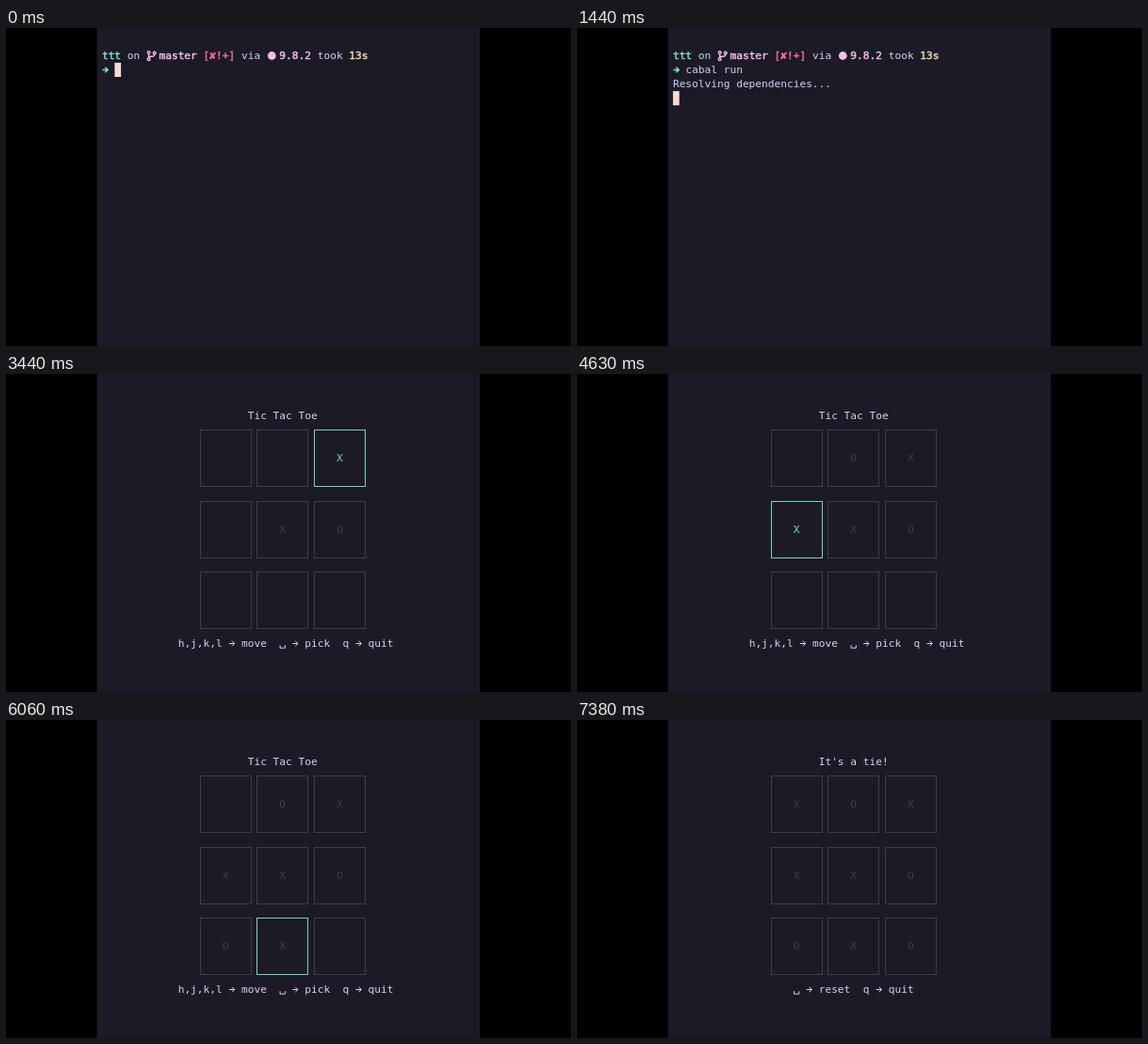
Animation, 600 px wide and 338 px high, one loop 8000 ms. Source, as an HTML page with a canvas:

```html
<!DOCTYPE html>
<html lang="en">
<head>
<meta charset="utf-8">
<title>Terminal tic tac toe</title>
<style>
  html, body { margin: 0; width: 100%; height: 100%; overflow: hidden; background: #000; }
  canvas { display: block; width: 600px; height: 338px; }
</style>
</head>
<body>
<canvas id="stage" width="600" height="338"></canvas>
<script>
const ctx = document.getElementById('stage').getContext('2d');

const LOOP = 8000;
const COL = 6.73, ROW = 15.1, LEFT = 101.9, FIRST_ROW = 29.3;
const FONT = '11.18px "DejaVu Sans Mono", "Noto Sans Mono", monospace';
const COLORS = {
  panel: '#1c1a26', text: '#cdd6f4', teal: '#84e4d2', green: '#86efb4',
  pink: '#f5bfe6', red: '#f2709f', yellow: '#f0dfae', cursor: '#f5dad5',
  dim: '#3e3d48', active: '#76d3c0'
};

const COMMAND = 'cabal run';
const TYPE_START = 60, TYPE_STEP = 93.75;
const ENTER = 1000, RESOLVE = 1190, GAME = 1630, TIE = 7060;

// A two-letter action is a step of the selection; "pick" places the mark.
const STEPS = { up: [0, -1], dn: [0, 1], lf: [-1, 0], rt: [1, 0] };
const ACTIONS = [
  [2560, 'pick'], [2880, 'rt'], [3250, 'pick'], [3440, 'up'],
  [3690, 'pick'], [3880, 'lf'], [4060, 'pick'], [4500, 'lf'],
  [4630, 'dn'], [5000, 'pick'], [5250, 'dn'], [5690, 'pick'],
  [5880, 'rt'], [6000, 'pick'], [6190, 'rt'], [6440, 'pick'],
  [6500, 'up'], [6690, 'up'], [6810, 'lf'], [6940, 'lf'], [TIE, 'pick']
];

const colX = col => LEFT + col * COL;
const rowY = row => FIRST_ROW + row * ROW;

// Semi-bold text is the regular face with a thin outline.
function write(text, col, row, color = COLORS.text, bold = false) {
  const x = colX(col), y = Math.round(rowY(row) + 3.7);
  ctx.font = FONT;
  ctx.fillStyle = color;
  ctx.fillText(text, x, y);
  if (bold) {
    ctx.strokeStyle = color;
    ctx.lineWidth = 0.45;
    ctx.strokeText(text, x, y);
  }
}

function polyline(color, width, points) {
  ctx.strokeStyle = color;
  ctx.lineWidth = width;
  ctx.beginPath();
  for (const [x, y] of points) ctx.lineTo(x, y);
  ctx.stroke();
}

function arrow(col, row, color = COLORS.text, width = 1) {
  const x = colX(col), y = Math.floor(rowY(row)) + 0.5;
  polyline(color, width, [[x + 0.5, y], [x + 6, y]]);
  polyline(color, width, [[x + 3.4, y - 2.8], [x + 6.2, y], [x + 3.4, y + 2.8]]);
}

function spaceKey(col) {
  const x = colX(col), y = rowY(17);
  polyline(COLORS.text, 1,
    [[x + 0.7, y + 2.2], [x + 0.7, y + 5.2], [x + 6, y + 5.2], [x + 6, y + 2.2]]);
}

function cursor(col, row) {
  ctx.fillStyle = COLORS.cursor;
  ctx.fillRect(colX(col), rowY(row) - 7.5, COL, ROW);
}

function disc(x, y, r) {
  ctx.beginPath();
  ctx.arc(x, y, r, 0, Math.PI * 2);
}

function branchIcon() {
  ctx.strokeStyle = COLORS.pink;
  ctx.lineWidth = 1.4;
  for (const [x, y] of [[151.6, 26], [151.6, 33.2], [157.7, 26.6]]) {
    disc(x, y, 1.4);
    ctx.stroke();
  }
  ctx.beginPath();
  ctx.moveTo(151.6, 27.4);
  ctx.lineTo(151.6, 31.8);
  ctx.moveTo(157.7, 28);
  ctx.quadraticCurveTo(157.7, 30.2, 155, 30.2);
  ctx.lineTo(151.6, 30.4);
  ctx.stroke();
}

function drawShell(t) {
  write('ttt', 0, 0, COLORS.teal, true);
  write('on', 4, 0);
  branchIcon();
  write('master', 9, 0, COLORS.pink, true);
  write('[✘!+]', 16, 0, COLORS.red, true);
  write('via', 22, 0);
  ctx.fillStyle = COLORS.pink;
  disc(282.3, 29.5, 4.4);
  ctx.fill();
  write('9.8.2', 28, 0, COLORS.pink, true);
  write('took', 34, 0);
  write('13s', 39, 0, COLORS.yellow, true);
  arrow(0, 1, COLORS.green, 1.5);

  const typed = t < TYPE_START ? 0
    : Math.min(COMMAND.length, Math.floor((t - TYPE_START) / TYPE_STEP) + 1);
  write(COMMAND.slice(0, typed), 2, 1);
  if (t >= RESOLVE) write('Resolving dependencies...', 0, 2);

  if (t < ENTER) cursor(2 + typed, 1);
  else cursor(0, t < RESOLVE ? 2 : 3);
}

function gameAt(t) {
  const game = { x: 1, y: 1, marks: {}, turn: 'X' };
  for (const [time, action] of ACTIONS) {
    if (time > t) break;
    if (action === 'pick') {
      game.marks[[game.x, game.y]] = game.turn;
      game.turn = game.turn === 'X' ? 'O' : 'X';
    } else {
      game.x += STEPS[action][0];
      game.y += STEPS[action][1];
    }
  }
  return game;
}

function drawCell(x, y, mark, border, ink) {
  const col = 15 + 9 * x, row = 2 + 5 * y;
  const snap = v => Math.floor(v) + 0.5;
  const left = snap(colX(col + 0.5)), top = snap(rowY(row));
  ctx.strokeStyle = border;
  ctx.lineWidth = 1;
  ctx.strokeRect(left, top,
    snap(colX(col + 8.5)) - left, snap(rowY(row + 4)) - top);
  if (mark) write(mark, col + 4, row + 2, ink);
}

function drawGame(t) {
  const { x: selX, y: selY, marks, turn } = gameAt(t);
  const over = t >= TIE;
  write(over ? "It's a tie!" : 'Tic Tac Toe', 23, 1);

  for (let y = 0; y < 3; y++) {
    for (let x = 0; x < 3; x++) {
      const selected = !over && x === selX && y === selY;
      const mark = marks[[x, y]];
      const preview = selected && !mark;
      drawCell(x, y, preview ? turn : mark,
        selected ? COLORS.active : COLORS.dim,
        preview ? COLORS.active : COLORS.dim);
    }
  }

  if (over) {
    spaceKey(19);
    arrow(21, 17);
    write('reset  q', 23, 17);
    arrow(32, 17);
    write('quit', 34, 17);
  } else {
    write('h,j,k,l', 12, 17);
    arrow(20, 17);
    write('move', 22, 17);
    spaceKey(28);
    arrow(30, 17);
    write('pick  q', 32, 17);
    arrow(40, 17);
    write('quit', 42, 17);
  }
}

function frame(now) {
  const t = now % LOOP;
  ctx.fillStyle = '#000';
  ctx.fillRect(0, 0, 600, 338);
  ctx.fillStyle = COLORS.panel;
  ctx.fillRect(96.6, 0, 406.7, 338);
  if (t < GAME) drawShell(t);
  else drawGame(t);
  requestAnimationFrame(frame);
}
requestAnimationFrame(frame);
</script>
</body>
</html>
```
